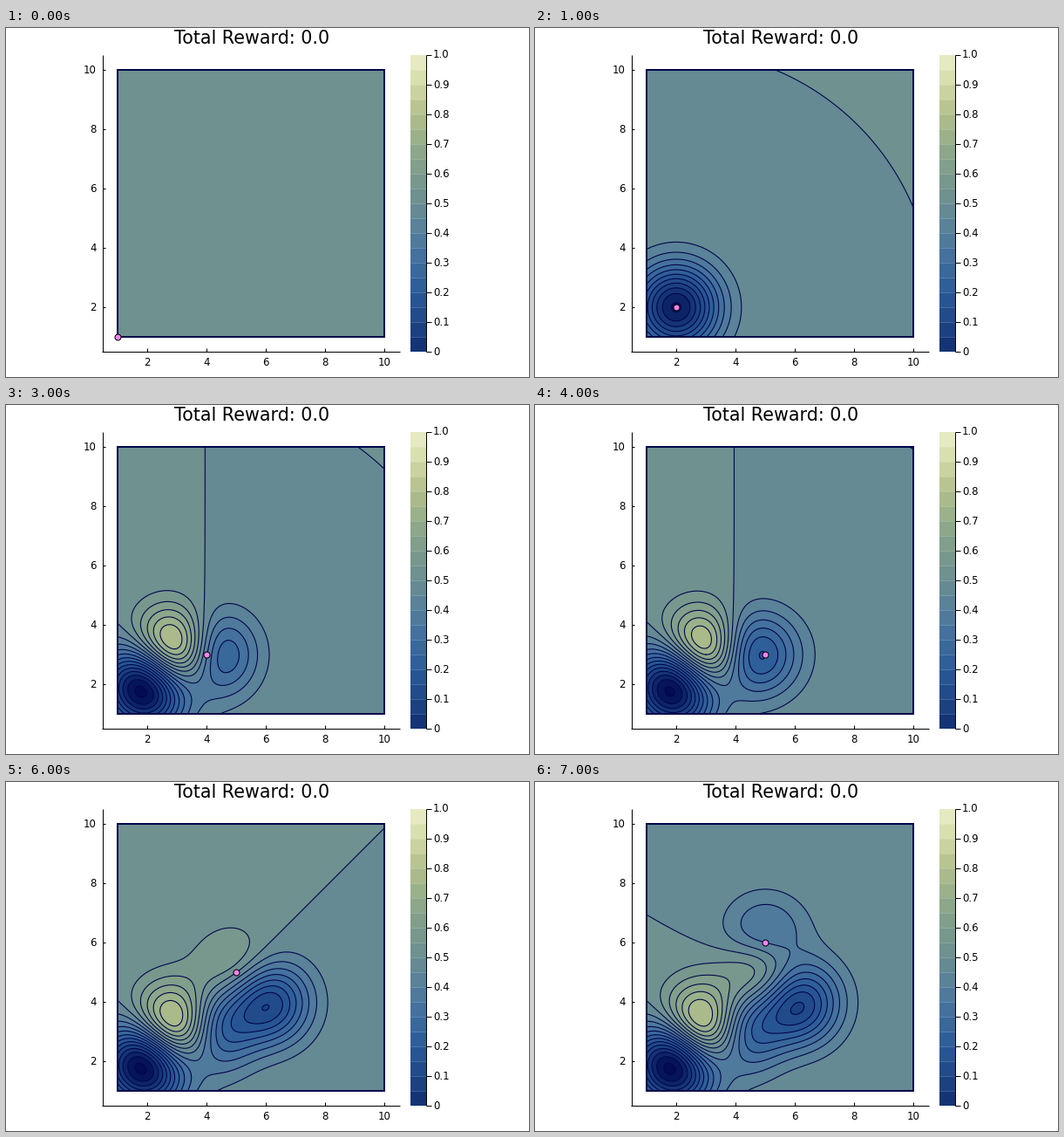
Write a matplotlib script that moves like this. It is 600 px wide and 400 px high and loops after 8000 ms.

```python
import numpy as np
import matplotlib.pyplot as plt
from matplotlib.animation import FuncAnimation
from matplotlib.colors import LinearSegmentedColormap
from matplotlib.patches import Rectangle

W, H, DPI = 600, 400, 100
PX = 72 / DPI
NAVY = "#00054a"
TICK_SIZE = 11.8

# The agent steps one cell at a time and measures each cell it reaches.
# Measurements are relative to the prior mean of 0.5.
STEPS = [1 + 1j, 1 + 1j, 1, 1, 1 + 1j, -1 + 1j, 1j]
MEASURED = np.array([-0.557, 0.2, -0.094, -0.3, -0.394, 0.002, -0.1])
CELLS = np.cumsum([1 + 1j] + STEPS)
PATH = np.column_stack([CELLS.real, CELLS.imag])
ROUNDING = 2.8e-17  # smaller deviations count as exactly the prior

# Evenly spaced colours over the value range
V_MIN, V_MAX = -0.1, 1.1
CMAP = LinearSegmentedColormap.from_list("reward", [
    "#030c52", "#183c7c", "#2a5a98", "#49769e", "#6b8e92",
    "#85a289", "#b1bf8a", "#e2e5b6", "#fcfcf6"], N=1024)


def color(value):
    return CMAP((value - V_MIN) / (V_MAX - V_MIN))


def px(x):
    return 128 + 34.05 * (x - 1)


def py(y):
    return 354.1 - 34.02 * (y - 1)


def kernel(a, b):
    gap = a[:, None, :] - b[None, :, :]
    return np.exp(-0.5 * (gap ** 2).sum(axis=-1))


AXIS = np.linspace(1, 10, 181)
GX, GY = np.meshgrid(AXIS, AXIS)
GRID = np.column_stack([GX.ravel(), GY.ravel()])
LEVELS = np.arange(-13, 12) * 0.05
FILLS = [color(0.525 + low) for low in LEVELS[:-1]]


def posterior(count):
    """Gaussian process mean, relative to the prior, after count measurements."""
    seen = PATH[1:count + 1]
    weights = np.linalg.solve(kernel(seen, seen), MEASURED[:count])
    return (kernel(GRID, seen) @ weights).reshape(GX.shape) + ROUNDING


fig = plt.figure(figsize=(W / DPI, H / DPI), dpi=DPI, facecolor="white")
ax = fig.add_axes([0, 0, 1, 1])
ax.set_xlim(0, W)
ax.set_ylim(H, 0)
ax.axis("off")


def line(xs, ys, width=1, **style):
    style.setdefault("color", "black")
    ax.plot(xs, ys, lw=width * PX, solid_capstyle="butt", **style)


def label(x, y, text, size=TICK_SIZE, **style):
    ax.text(x, y, text, fontsize=size * PX, family="DejaVu Sans",
            va="baseline", **style)


def draw_axes():
    left, right, top, bottom = 110.5, 451.5, 30.5, 370.5
    label(281.8, 18, "Total Reward: 0.0", TICK_SIZE * 14 / 8, ha="center")
    line([left, left], [top, bottom + 0.5])
    line([left - 0.5, right], [bottom, bottom])
    for tick in range(2, 11, 2):
        x, y = px(tick), py(tick)
        line([x, x], [bottom - 3.5, bottom])
        line([left, left + 3.5], [y, y])
        label(x, 387.3, str(tick), ha="center")
        label(103.5, y + 4.2, str(tick), ha="right")


def draw_colorbar():
    left, right, top, bottom = 464, 481.5, 30.5, 371
    step = (bottom - top) / 20
    for i in range(20):
        y = bottom - (i + 1) * step
        ax.add_patch(Rectangle((left, y), right - left, step, lw=0,
                               fc=color(0.05 * i + 0.025)))
        if i < 19:
            line([left, right], [y, y], 0.6, color="white", alpha=0.3)
    line([right, right], [top, bottom])
    for i in range(11):
        y = bottom - 2 * i * step
        line([right, right + 6], [y, y])
        label(490, y + 4.0, f"{i / 10:.1f}" if i else "0", ha="left")


draw_axes()
draw_colorbar()
ax.add_patch(Rectangle((px(1), py(10)), px(10) - px(1), py(1) - py(10),
                       fill=False, ec=NAVY, lw=2 * PX, zorder=4))
agent, = ax.plot([], [], "o", ms=7 * PX, mfc="#ff83f0", mec="black",
                 mew=PX, zorder=5)
contours = []


def update(frame):
    while contours:
        contours.pop().remove()
    field = posterior(frame) if frame else np.full(GX.shape, ROUNDING)
    surface = px(GX), py(GY), field, LEVELS
    contours.append(ax.contourf(*surface, colors=FILLS, zorder=1))
    if frame:
        contours.append(ax.contour(*surface, colors=[NAVY], linewidths=1.1 * PX,
                                   linestyles="solid", zorder=3))
    x, y = PATH[frame]
    agent.set_data([px(x)], [py(y)])
    return [agent]


anim = FuncAnimation(fig, update, frames=len(PATH), interval=1000,
                     repeat=True, repeat_delay=0, blit=False)
plt.show()
```
